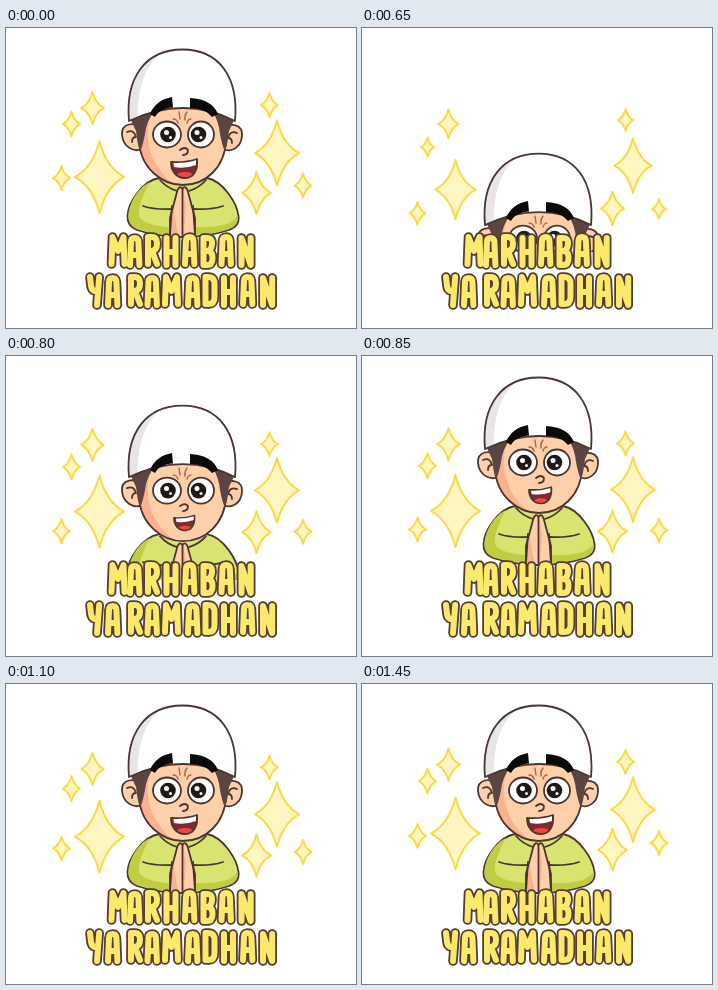
An HTML page for the animation above (1500 ms loop, 350x300 px).

```html
<!DOCTYPE html>
<html lang="id">
<head>
<meta charset="utf-8">
<title>Marhaban ya Ramadhan</title>
<style>
html, body { margin: 0; width: 100%; height: 100%; overflow: hidden; background: #fff; }
svg { display: block; width: 350px; height: 300px; }
.line { fill: none; stroke: #4a3531; stroke-width: 1.8; stroke-linecap: round; stroke-linejoin: round; }
.ink { stroke: #4a3531; stroke-width: 1.8; stroke-linejoin: round; }
.skin { fill: #fecfa9; }
.shade { fill: #fbb18e; }
.hair { fill: #5a4540; }
.cloth { fill: #d8e46f; }
.fold { fill: #c0cd43; }
.star { fill: #fff6c2; stroke: #fad946; stroke-width: 2; stroke-linejoin: round; }
#back, #front { fill: none; stroke-linejoin: round; }
#back { stroke: #543d34; stroke-width: 9.6; stroke-linecap: round; }
#front { stroke: #fae96b; stroke-width: 6; stroke-linecap: round; }
</style>
</head>
<body>
<svg viewBox="0 0 350 300" role="img" aria-label="MARHABAN YA RAMADHAN">
  <clipPath id="stage"><rect width="350" height="224"/></clipPath>
  <clipPath id="faceClip"><path d="M133 80V114C135 141 156 157 177 157C199 157 218 141 220 114V80Z"/></clipPath>
  <clipPath id="hatClip"><path d="M123 93C119 49 140 21.500 176.500 21.500C213 21.500 233 49 229 93Q204 80 177 80T123 93Z"/></clipPath>
  <clipPath id="mouthClip"><path d="M165 134Q179 135 191 131C192 142 188 150 179 150C170 150 165 143 165 134Z"/></clipPath>
  <g id="stars"></g>
  <g clip-path="url(#stage)">
    <g id="boy">
      <!-- body -->
      <path class="cloth ink" d="M153 150C136 153 122 175 121.500 188Q121 198 131 202Q152 209 177 209T223 202Q234 198 232.500 188C231 175 217 153 201 150Z"/>
      <path class="fold" d="M144 154C131 160 123 176 122.500 188Q122 197 131 201Q146 206 164 207L164 199Q142 198 134 190Q129 182 144 154ZM190 207Q210 206 223 201Q233 197 231.500 188Q226 195 217 197Q204 200 190 199Z"/>
      <path class="line" d="M137 178Q149 182 166 181M217 178Q205 182 188 181M154 152Q161 160 171 163M200 152Q193 160 183 163"/>
      <!-- ears and hair -->
      <path class="skin ink" d="M135 101C129 93 115 95 116 107C117 118 127 125 136 121Z"/>
      <path class="skin ink" d="M218 101C224 94 237 96 236 108C235 119 226 125 217 121Z"/>
      <path class="line" d="M121 104Q128 101 130 109Q126 109 126 114M231 105Q224 102 222 110Q226 110 226 115"/>
      <!-- face -->
      <path class="skin" d="M133 80V114C135 141 156 157 177 157C199 157 218 141 220 114V80Z"/>
      <path class="shade" clip-path="url(#faceClip)" d="M130 84H145C136 116 146 140 170 158H130Z"/>
      <path class="line" d="M133 112C134 140 156 157 177 157C199 157 219 140 220 112"/>
      <path class="hair" d="M124 90L149 82Q140 94 139 106Q137 117 134 124Q131 114 130 103Z"/>
      <path class="hair" d="M229 90L206 82Q213 94 214 106Q216 117 219 124Q222 114 223 103Z"/>
      <!-- hat -->
      <path fill="#fff" d="M123 93C119 49 140 21.500 176.500 21.500C213 21.500 233 49 229 93Q204 80 177 80T123 93Z"/>
      <path fill="#e6e6e7" clip-path="url(#hatClip)" d="M120 96V20H162C141 32 130 58 132 96Z"/>
      <path class="line" d="M123 93C119 49 140 21.500 176.500 21.500C213 21.500 233 49 229 93Q204 80 177 80T123 93Z"/>
      <!-- eyes -->
      <ellipse class="ink" cx="161" cy="106.500" rx="14" ry="13" fill="#fff"/>
      <ellipse class="ink" cx="195" cy="106.500" rx="13" ry="13" fill="#fff"/>
      <g fill="#211716"><circle cx="162" cy="106.500" r="7.800"/><circle cx="192.500" cy="106.500" r="7.800"/></g>
      <g fill="#fff">
        <circle cx="160.500" cy="104.500" r="2.500"/><circle cx="191" cy="104.500" r="2.500"/>
        <circle cx="164.500" cy="109.500" r="1.500"/><circle cx="195" cy="109.500" r="1.500"/>
      </g>
      <path fill="#0c0909" d="M144 86C148 76 156 71 166 69L167 79.500C159 80 152 83 149 89ZM212 86C208 76 199 71 184 70L184 80C194 80 201 83 206 89Z"/>
      <path d="M173 84L174 91M181 84Q178 88 179 92M167 91Q171 91 172 95M185 91Q182 91 181 95" fill="none" stroke="#b0664a" stroke-width="1.400" stroke-linecap="round"/>
      <path class="line" d="M174 122Q179 118 182 122Q182 127 177 127"/>
      <!-- mouth -->
      <g id="mouth">
        <g clip-path="url(#mouthClip)">
          <rect x="163" y="128" width="30" height="26" fill="#7d2b30"/>
          <path fill="#fff" d="M167 131H190V137Q179 141 168 139Z"/>
          <ellipse cx="179" cy="148.500" rx="9" ry="4.500" fill="#f2463d"/>
        </g>
        <path class="line" d="M165 134Q179 135 191 131C192 142 188 150 179 150C170 150 165 143 165 134Z"/>
      </g>
      <!-- hands -->
      <path class="skin ink" d="M176.500 161Q174 157 171.500 162L167 179L164 190V209H189V190L186 179L181.500 162Q179 157 176.500 161Z"/>
      <path class="shade" d="M165 191L168 181Q169 193 173 208H165ZM177.500 163L180 180L178 206Z"/>
      <path class="line" d="M176.500 161V207M166 178L164 207M187 178L189 207"/>
    </g>
  </g>
  <g id="back"></g>
  <g id="front"></g>
</svg>
<script>
const $ = id => document.getElementById(id);
const LOOP = 1500, STEP = 50, START = 550;

function add(parent, attrs) {
  const el = document.createElementNS('http://www.w3.org/2000/svg', 'path');
  for (const k in attrs) el.setAttribute(k, attrs[k]);
  return parent.appendChild(el);
}

// Lettering: centre lines of a rounded, condensed alphabet
const glyphs = {
  A: 'M0 27L1 4Q1 0 4.600 0T8.400 4L9.400 27M1 17H9',
  B: 'M0 0H4Q9 0 8.500 6T4 13H0M4 13Q9 13 9 20T4 27H0V0',
  D: 'M0 0V27H3Q9 27 9 20V7Q9 0 3 0Z',
  H: 'M0 0V27M9 0V27M0 14H9',
  M: 'M0 27L1 0L6.500 14L12 0L13 27',
  N: 'M0 27V0L9.200 27V0',
  R: 'M0 27V0H4Q9 0 9 6.500T4 14H0M4 14L9 27',
  Y: 'M0 0L1 9Q2 15 8 14M9.200 0L7 28'
};
const rows = [
  ['MARHABAN', 209, [105.5, 124, 142, 160.5, 179, 197.5, 215.5, 235.5]],
  ['YARAMADHAN', 249, [84, 102, 125, 141.5, 159, 182, 199.5, 218, 237, 257]]
];
for (const [word, y, xs] of rows)
  [...word].forEach((c, i) => {
    const transform = `translate(${xs[i]} ${y + i % 2})`;
    for (const id of ['back', 'front']) add($(id), { d: glyphs[c], transform });
  });

// x, half width, half height, y at pop, y when grown, y at end, scale at pop
const stars = [
  [86.5, 11.3, 16, 106, 89.5, 80, .7],
  [65.5, 8.5, 12.5, 129, 112, 96, .27],
  [93.5, 24.5, 36, 171, 156, 149, .46],
  [55.5, 8.5, 12, 195, 177, 150, .83],
  [263.5, 8.5, 12, 95, 89, 77, .7],
  [271, 22, 32.5, 140, 135, 125, .53],
  [250.5, 14.3, 21, 184, 177, 165, .4],
  [297, 8.5, 12, 184, 177, 157.5, .44]
].map(s => ({ s, el: add($('stars'), { class: 'star' }) }));

const clamp = v => Math.max(0, Math.min(1, v));
const mix = (a, b, p) => a + (b - a) * p;

function starPath(x, y, w, h) {
  const k = .27;
  return `M${x} ${y - h}Q${x + w * k} ${y - h * k} ${x + w} ${y}` +
    `Q${x + w * k} ${y + h * k} ${x} ${y + h}` +
    `Q${x - w * k} ${y + h * k} ${x - w} ${y}` +
    `Q${x - w * k} ${y - h * k} ${x} ${y - h}Z`;
}

// Stretch at the top of the jump, squash, then settle
function squash(t) {
  if (t < 850 || t >= 1050) return 0;
  if (t <= 900) return mix(0, -.6, (t - 850) / 50);
  if (t <= 950) return mix(-.6, 1, (t - 900) / 50);
  return mix(1, 0, (t - 950) / 100);
}

function draw(time) {
  let t = Math.floor((time % LOOP) / STEP) * STEP;
  if (t < START) t = LOOP;

  const grow = clamp((t - START) / 150);
  const drift = (t - 750) / 750;
  for (const { s: [x, w, h, y0, y1, y2, k], el } of stars) {
    const size = mix(k, 1, grow);
    const y = mix(y0, mix(y1, y2, drift), grow);
    el.setAttribute('d', starPath(x, y, w * size, h * size));
  }

  const dy = 141 * (1 - clamp((t - START) / 300) ** 1.22);
  const q = squash(t);
  $('boy').setAttribute('transform',
    `translate(177 ${dy + 4 * q}) scale(${1 + .09 * q} 1) translate(-177 0)`);

  const open = mix(.7, 1, clamp((t - 730) / 220)) + .1 * Math.max(0, q);
  $('mouth').setAttribute('transform',
    `translate(179 132) scale(${open}) translate(-179 -132)`);
}

let origin;
function tick(now) {
  origin ??= now;
  draw(now - origin);
  requestAnimationFrame(tick);
}
draw(0);
requestAnimationFrame(tick);
</script>
</body>
</html>
```
